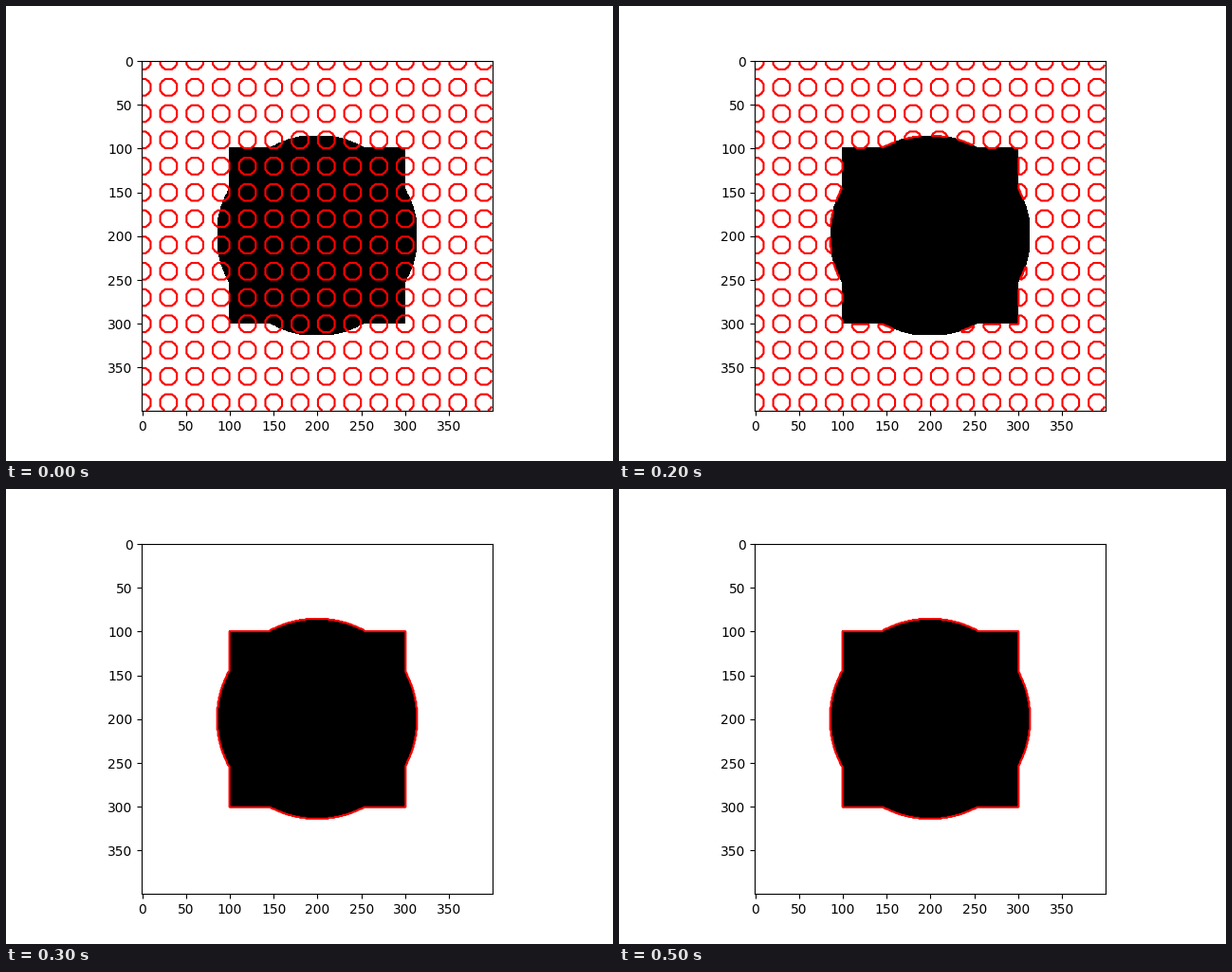
A matplotlib script that plays this animation: 640 px wide and 480 px high, repeating every 0.6 s.

```python
import numpy as np
import matplotlib.pyplot as plt
from matplotlib.animation import FuncAnimation

SIZE = 400
SPACING, SEED_RADIUS = 30, 10
FRAMES, INTERVAL = 6, 100

y, x = np.mgrid[:SIZE, :SIZE]


def disc(dx, dy, radius):
    return dx**2 + dy**2 < radius**2


def offset_to_grid(v):
    """Signed distance to the nearest multiple of SPACING."""
    return (v + SPACING // 2) % SPACING - SPACING // 2


square = (x >= 100) & (x <= 300) & (y >= 100) & (y <= 300)
shape = square | disc(x - 199.5, y - 199.5, 114.3)
seeds = disc(offset_to_grid(x), offset_to_grid(y), SEED_RADIUS)

fig, ax = plt.subplots(figsize=(6.4, 4.8), dpi=100)
ax.imshow(~shape, cmap="gray", vmin=0, vmax=1, interpolation="nearest")


def outline(region):
    return ax.contour(region.astype(float), levels=[0.5], colors="red",
                      linewidths=1.5)


# The seeds first vanish inside the shape, then outside it.
stages = [outline(region) for region in (seeds, seeds & ~shape, shape)]


def update(frame):
    current = min(max(frame - 1, 0), 2)
    for i, stage in enumerate(stages):
        stage.set_visible(i == current)
    return stages


anim = FuncAnimation(fig, update, frames=FRAMES, interval=INTERVAL,
                     repeat=True, repeat_delay=0)
plt.show()
```
